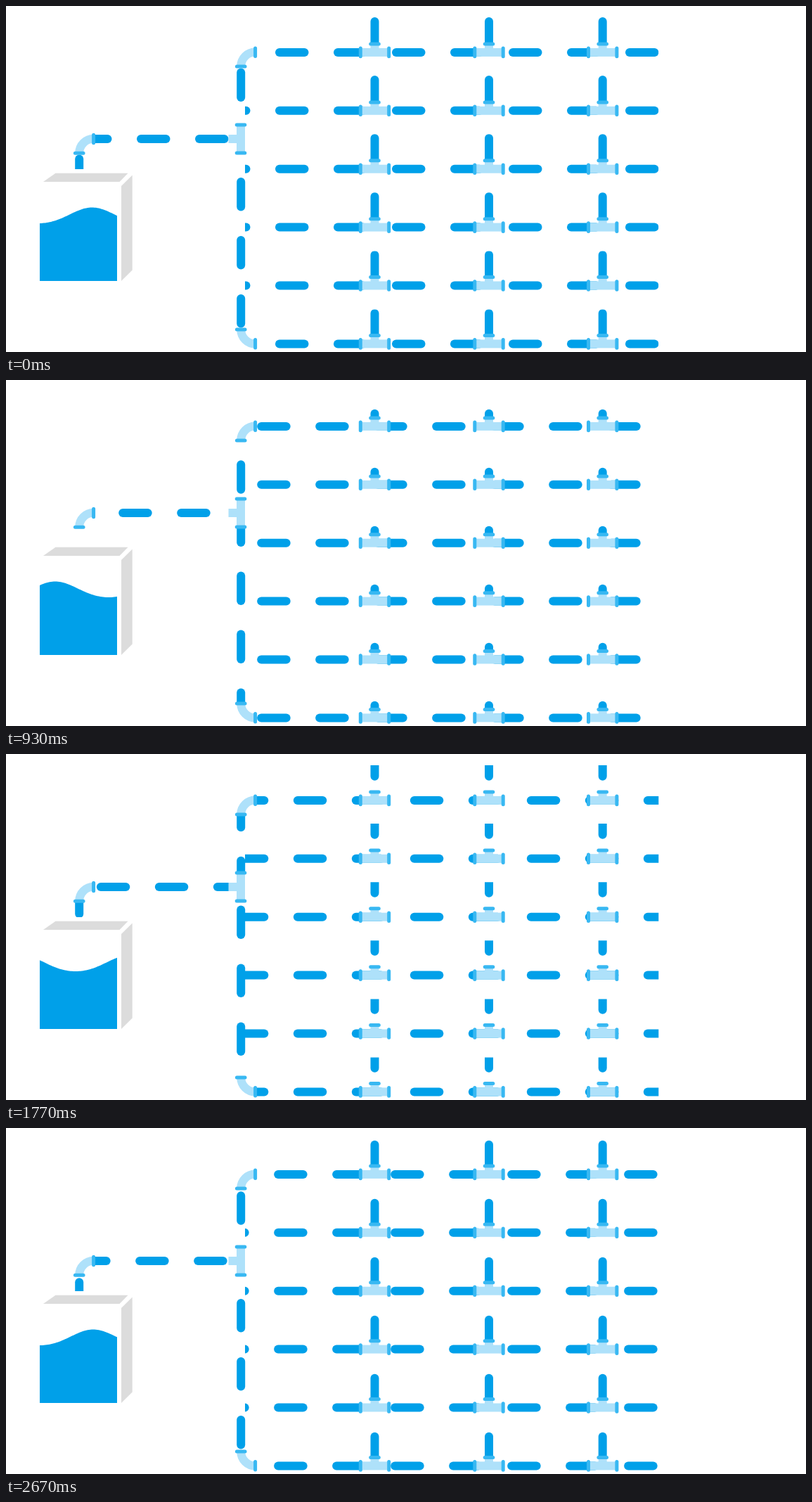
An HTML page with a canvas that plays this animation: 1138 px wide and 492 px high, repeating every 2700 ms.

```html
<!DOCTYPE html>
<html lang="en">
<head>
<meta charset="utf-8">
<title>Water supply</title>
<style>
  html, body { margin: 0; width: 100%; height: 100%; overflow: hidden; background: #fff; }
  canvas { display: block; }
</style>
</head>
<body>
<canvas id="stage" width="1138" height="492"></canvas>
<script>
const ctx = document.getElementById('stage').getContext('2d');
const WATER = '#00a0e9', PIPE = '#aee1fa', JOINT = '#38b8f2', GREY = '#dcdcdc';
const LOOP = 2700, STEP = 30, PERIOD = 83, DASH = 47.5, BORE = 12;
const TEES = [524.5, 687, 848.7];
const ROWS = 6, ROW_Y = 65.9, ROW_GAP = 82.9;

function box(x, y, w, h, color) {
  ctx.fillStyle = color;
  ctx.fillRect(x, y, w, h);
}

function polygon(points, color) {
  ctx.fillStyle = color;
  ctx.beginPath();
  for (const [x, y] of points) ctx.lineTo(x, y);
  ctx.fill();
}

function line(x1, y1, x2, y2, width, color) {
  ctx.lineCap = 'round';
  ctx.lineWidth = width;
  ctx.strokeStyle = color;
  ctx.beginPath();
  ctx.moveTo(x1, y1);
  ctx.lineTo(x2, y2);
  ctx.stroke();
}

const jointH = (x, y) => line(x - 5.8, y, x + 5.8, y, 5, JOINT);
const jointV = (x, y) => line(x, y - 5.8, x, y + 5.8, 5, JOINT);

// Dashes along one axis, visible between from and to; first is the start of any dash.
function flow(vertical, axis, from, to, first) {
  const r = BORE / 2;
  ctx.save();
  ctx.beginPath();
  if (vertical) ctx.rect(axis - r - 1, from, BORE + 2, to - from);
  else ctx.rect(from, axis - r - 1, to - from, BORE + 2);
  ctx.clip();
  const lead = (((first - from) % PERIOD) + PERIOD) % PERIOD;
  for (let s = from + lead - PERIOD; s < to; s += PERIOD) {
    const a = s + r, b = s + DASH - r;
    if (vertical) line(axis, a, axis, b, BORE, WATER);
    else line(a, axis, b, axis, BORE, WATER);
  }
  ctx.restore();
}

// Quarter bend: vertical end at (x, y), side = 1 turns up, -1 turns down.
function elbow(x, y, side) {
  const r = 20.4;
  ctx.lineCap = 'butt';
  ctx.lineWidth = BORE;
  ctx.strokeStyle = PIPE;
  ctx.beginPath();
  ctx.arc(x + r, y, r, Math.PI, Math.PI + side * Math.PI / 2, side < 0);
  ctx.stroke();
  jointH(x, y);
  jointV(x + r, y - side * 20.2);
}

function rowTee(x, y) {
  box(x - 20, y - 6, 40, BORE, PIPE);
  box(x - 6, y - 12, BORE, 7, PIPE);
  jointV(x - 20.2, y);
  jointV(x + 20.2, y);
  jointH(x, y - 11.9);
}

function mainTee() {
  box(328, 169, BORE, 40, PIPE);
  box(316.5, 183, 12, BORE, PIPE);
  jointH(334, 169);
  jointH(334, 209);
}

function tank(phase) {
  polygon([[53, 250], [70.5, 237.7], [173.5, 237.7], [161.5, 250]], GREY);
  polygon([[164, 256], [179.7, 240.5], [179.7, 375.5], [164, 391]], GREY);
  const length = 152, crest = 122.5 - phase * length;
  const surface = [[158, 391], [48, 391]];
  for (let x = 48; x <= 158; x += 2) {
    const a = (x - crest) / length * 2 * Math.PI;
    surface.push([x, 297.75 - 11.25 * Math.cos(a) + 1.6 * Math.sin(a) ** 2]);
  }
  polygon(surface, WATER);
}

function draw(phase) {
  const fast = phase * 2 * PERIOD, slow = phase * PERIOD;
  box(0, 0, 1138, 492, '#fff');
  tank(phase);

  flow(true, 104.2, 209, 232, 211.5 - fast);
  flow(false, 189, 124.5, 317, 186 + fast);
  flow(true, 334.2, 86, 169, 88.5 - fast);
  flow(true, 334.2, 209, 460, 244 + slow);

  for (let i = 0; i < ROWS; i++) {
    const y = ROW_Y + i * ROW_GAP;
    const bend = i === 0 || i === ROWS - 1;
    flow(false, y, bend ? 354.5 : 340, 928.3, 383 + fast);
    for (const x of TEES) {
      flow(true, x, 16 + i * 83.1, y - 11.9, 16 + i * PERIOD - fast);
      rowTee(x, y);
    }
  }

  elbow(104.2, 209.2, 1);
  elbow(334.2, 86, 1);
  elbow(334.2, 460, -1);
  mainTee();
}

const start = performance.now();
function tick() {
  const t = Math.max(0, performance.now() - start) % LOOP;
  draw(Math.floor(t / STEP) * STEP / LOOP);
  requestAnimationFrame(tick);
}
tick();
</script>
</body>
</html>
```
